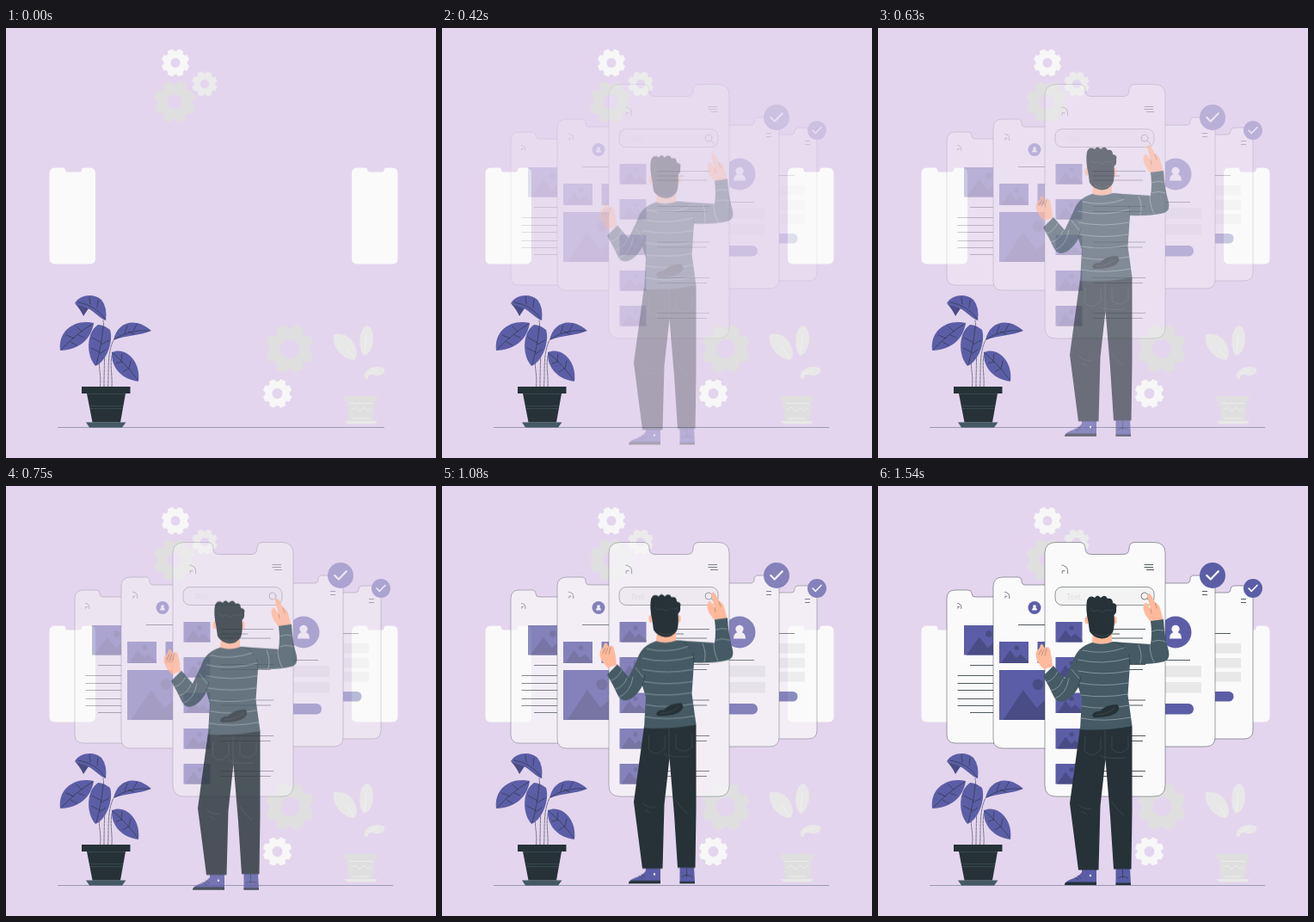
Recreate the animation shown at these times as an HTML page. Size 500x500 px, loop 1620 ms.

```html
<!DOCTYPE html>
<html lang="en">
<head>
<meta charset="utf-8">
<title>App screens</title>
<style>
  html, body { margin: 0; width: 100%; height: 100%; overflow: hidden; background: #e4d5ee; }
  svg { display: block; width: 100vw; height: 100vh; }
  .ink { fill: none; stroke: #263238; stroke-width: .6; stroke-linecap: round; stroke-linejoin: round; }
  .rule { fill: none; stroke: #263238; stroke-width: .8; }
  .screen { fill: #fafafa; stroke: #263238; stroke-width: .45; }
  .violet { fill: #5b5ea6; }
  .deep { fill: #4a4c85; }
  .dark { fill: #263238; }
  .slate { fill: #455a64; }
  .skin { fill: #ffb99b; }
  .pale { fill: #e8e8e8; }
  .grey { fill: #dfdfdf; }
  .white { fill: #fafafa; }
  .tick { fill: none; stroke: #fff; stroke-linecap: round; stroke-linejoin: round; }
  .knit { fill: none; stroke: #aebbc1; stroke-width: .6; stroke-linecap: round; }
  .seam { fill: none; stroke: #4d5b63; stroke-width: .5; }
</style>
</head>
<body>
<svg viewBox="0 0 500 500" xmlns="http://www.w3.org/2000/svg">
  <g id="gears"></g>

  <g class="white">
    <path id="blank" d="M57 162.500H66Q69 162.500 69 165Q69 167.500 72 167.500H85Q88 167.500 88 165Q88 162.500 91 162.500H97.500Q104 162.500 104 169V268Q104 274.500 97.500 274.500H57Q50.500 274.500 50.500 268V169Q50.500 162.500 57 162.500Z"/>
    <use href="#blank" x="351.500"/>
  </g>

  <path id="floor" fill="none" stroke="#75839a" stroke-width=".7"/>

  <!-- pale pot -->
  <g class="pale">
    <path d="M381 357C379 371 391 385 405 386C413 380 404 355 387 356Q383 355 381 357Z"/>
    <path d="M417 381C408 375 410 348 420 346C431 350 428 377 417 381Z"/>
    <path d="M417 407C415 396 430 391 440 396C442 403 433 406 426 403Q420 403 421 408Z"/>
    <path class="grey" d="M394 428H432V434H429.500L427 457H399L396.500 434H394Z"/>
    <path d="M394 457H432L429 460.500H397Z"/>
    <path d="M399 436.500H427M401 444l5 -3 5 5 5 -5 5 4 4 -3M403 454H423" fill="none" stroke="#eee" stroke-width=".9"/>
    <path d="M395 371L404 383M419 356L417 378M421 402L432 398" fill="none" stroke="#f5f5f5" stroke-width=".6"/>
  </g>

  <!-- plant -->
  <path class="ink" stroke-dasharray="3 1.200" d="M109.500 417C111 402 107 395 109 385M114 417C114 390 116 370 113 340M118.500 417C120 398 117 380 125 363M123 417C124 404 120 390 124 378"/>
  <g class="violet">
    <path d="M80 320C86 310 102 308 111 316Q118 325 116 340C108 337 102 329 95 326Z"/>
    <path class="deep" d="M80 320L96 326L90 335Q87 328 80 320Z"/>
    <path d="M102 343C80 338 60 352 63 375C84 374 99 363 102 343Z"/>
    <path d="M107 345C93 354 93 381 104 393C118 387 125 363 121 351Q114 345 107 345Z"/>
    <path d="M125 363C129 342 150 335 169 352C155 358 140 357 125 363Z"/>
    <path d="M123 377C122 397 137 409 154 411C157 387 139 370 123 377Z"/>
  </g>
  <path class="ink" d="M116 339Q104 322 84 319M106 325L107 316M98 321L97 313M101 344Q82 355 65 373M88 353L82 347M79 361L70 357M84 357L91 360M75 365L82 369M113 347Q111 370 105 391M111 366L100 360M109 377L99 372M111 368L120 363M109 379L116 374M126 362Q144 350 166 352M138 355L141 346M148 352L152 345M142 353L149 356M124 378Q138 389 153 409M134 387L135 379M143 396L145 387M135 388L128 390M142 396L136 400"/>
  <path class="slate" d="M93 458.500H139.500L135 464.500H97Z"/>
  <path class="dark" d="M88 417H144.500V425H139L133 458.500H100.500L94 425H88Z"/>
  <path d="M95 425.500H138M98 439.500H136M98 442.500H135" fill="none" stroke="#455a64" stroke-width=".6"/>

  <g id="phones"></g>

  <g id="man">
    <!-- shoes -->
    <path class="violet" d="M237 445H254V463H217Q219 459 225 457Q234 454 237 449Z"/>
    <path class="violet" d="M276.500 444H293L294 463H276.500Z"/>
    <path class="dark" d="M217 464Q217 461 219 460.500H254V464ZM276.500 461.500H294V464H276.500Z"/>
    <path class="ink" d="M232 453l4 3M229 455l4 3M284.500 446v10M279 456q6 -4 12 0"/>
    <circle cx="247" cy="453" r="1.200" class="white"/>
    <!-- trousers -->
    <path class="dark" d="M235 281L223 369L233 446.500H256.500L258.500 372L264.500 318L270 384L274 445.500H294.500L295.500 378V279Z"/>
    <path class="seam" d="M241 291L240 308Q245 313 251 313L259 307V292M272 291V306Q277 311 283 310L291 305V290M264 284V318M258 313Q264 318 288 316M233 370Q239 377 248 375M236 378l7 4M272 367Q277 376 286 383"/>
    <!-- hands -->
    <path class="skin" d="M193 213C186 207 182 199 184 193L188 188Q189 182 192 185L194 189Q198 185 200 190L202 200L203 210Z"/>
    <path class="skin" d="M318 159C312 152 307 145 309 138Q312 133 314 139L317 143L313 128Q314 123 317 126L322 135Q328 138 329 146L332 158Z"/>
    <path d="M187 196l3 -6M190 197l3 -7M194 197l2 -8M317 143l1 5M322 136l2 6" class="ink" stroke-opacity=".5"/>
    <!-- neck and sweater -->
    <path class="skin" d="M250 168H272V181Q262 188 249 183Z"/>
    <path class="slate" d="M249 182Q261 186 273 181L286 182L317 184Q319 172 317 157L332 155Q333 175 338 192Q340 201 333 204Q316 208 293 207L290.500 243L295.500 279Q265 285 235 283L237 247L233 234Q224 250 213 251Q207 251 204 244Q199 233 192 221L204 209L217 224L227 203Q232 187 249 182Z"/>
    <path class="knit" d="M238 191Q262 197 287 188M233 202Q260 209 293 200M233 215Q262 221 292 215M234 229Q262 234 291 229M236 243Q262 247 290 242M237 256Q262 261 292 255M236 270Q262 275 294 269M303 185Q308 196 305 206M316 184Q316 196 321 205M319 181Q326 178 334 181M318 169Q325 166 332 168M196 228Q204 226 209 216M201 238Q211 236 215 225M206 247Q219 242 222 224M225 213L234 224"/>
    <path class="dark" d="M249 267Q250 262 258 262Q265 254 278 254Q283 258 277 264Q269 269 255 269Q250 270 249 267Z"/>
    <path class="seam" d="M254 266Q266 266 276 258"/>
    <path class="ink" d="M277 182Q284 183 288 190M233 233L236 222M293 207L292 196"/>
    <!-- head -->
    <ellipse class="skin" cx="243" cy="156" rx="2.600" ry="4.500"/>
    <ellipse class="skin" cx="275" cy="156" rx="2.600" ry="4.500"/>
    <path class="dark" d="M244.500 158Q241 143 243 133Q246 126 252 130Q255 125 259 130Q264 125 267 131Q273 130 273 136Q279 137 277 142Q278 147 274.500 150Q275.500 164 273 170Q268 177.500 260 177.500Q250 176 246 169Z"/>
    <path class="seam" d="M247 142q4 6 8 2M256 144q4 5 9 0M266 143q4 4 8 0M252 172q8 5 17 0"/>
  </g>
</svg>
<script>
const $ = id => document.getElementById(id);

const gear = (x, y, r, hole, fill) => {
  const teeth = 8, pts = [];
  for (let i = 0; i < teeth; i++) {
    for (const [turn, k] of [[-.33, .83], [-.23, 1], [.23, 1], [.33, .83]]) {
      const a = (i + .5 + turn) / teeth * 2 * Math.PI;
      pts.push((x + r * k * Math.sin(a)).toFixed(1) + ' ' + (y - r * k * Math.cos(a)).toFixed(1));
    }
  }
  const ring = `M${x - hole} ${y}a${hole} ${hole} 0 1 0 ${2 * hole} 0a${hole} ${hole} 0 1 0 ${-2 * hole} 0Z`;
  return `<path fill="${fill}" stroke="${fill}" stroke-linejoin="round" fill-rule="evenodd" d="M${pts.join('L')}Z${ring}"/>`;
};

$('gears').innerHTML =
  gear(196, 86, 24, 9, '#dfdfdf') + gear(197, 40.5, 16, 6, '#f7f7f7') +
  gear(231, 65, 14.5, 5.5, '#ebebeb') + gear(330, 373, 28, 11.5, '#dfdfdf') +
  gear(315.5, 425, 16.5, 6.5, '#f7f7f7');

// Phone outline with a notch between n1 and n2.
const phone = (x1, y1, x2, y2, r, n1, n2, depth) => {
  const q = depth / 2;
  return `<path class="screen" d="M${x1 + r} ${y1}H${n1 - q}q${q} 0 ${q} ${q}q0 ${q} ${q} ${q}H${n2 - q}` +
    `q${q} 0 ${q} ${-q}q0 ${-q} ${q} ${-q}H${x2 - r}q${r} 0 ${r} ${r}V${y2 - r}q0 ${r} ${-r} ${r}` +
    `H${x1 + r}q${-r} 0 ${-r} ${-r}V${y1 + r}q0 ${-r} ${r} ${-r}Z"/>`;
};
const box = (x, y, w, h, cls, r = 0) =>
  `<rect class="${cls}" x="${x}" y="${y}" width="${w}" height="${h}" rx="${r}"/>`;
const dot = (x, y, r, cls) => `<circle class="${cls}" cx="${x}" cy="${y}" r="${r}"/>`;
const rule = (x1, x2, ...ys) =>
  `<path class="rule" d="${ys.map(y => `M${x1} ${y}H${x2}`).join('')}"/>`;

// Picture placeholder: sun and two hills.
const picture = (x, y, w, h) => box(x, y, w, h, 'violet') +
  dot(x + w * .6, y + h * .29, h * .11, 'deep') +
  `<path class="deep" d="M${x + w * .06} ${y + h}L${x + w * .37} ${y + h * .4}L${x + w * .58} ${y + h * .76}` +
  `L${x + w * .73} ${y + h * .58}L${x + w} ${y + h * .92}V${y + h}Z"/>`;

const person = (x, y, r) => dot(x, y, r, 'violet') + dot(x, y - r * .2, r * .25, 'white') +
  `<path class="white" d="M${x - r * .38} ${y + r * .4}q0 ${-r * .42} ${r * .38} ${-r * .42}q${r * .38} 0 ${r * .38} ${r * .42}Z"/>`;

const check = (x, y, r) => dot(x, y, r, 'violet') +
  `<path class="tick" stroke-width="${r * .15}" d="M${x - r * .45} ${y}l${r * .3} ${r * .3}l${r * .6} ${-r * .62}"/>`;

const home = (x, y, s) =>
  `<path class="ink" d="M${x - s * .8} ${y - s * 1.2}h${s * .4}q${s * 1.3} ${s * .5} ${s * 1.3} ${s * 1.4}v${s}M${x - s * .7} ${y + s * 1.1}v${-s * .7}h${s * .7}"/>`;

$('phones').innerHTML = [
  phone(80, 121, 190, 299, 10, 109, 160, 8),
  home(94.5, 139.5, 2.5), picture(100, 162, 48, 34.5),
  rule(107, 140, 208.5, 263.5), rule(92.5, 140, 220.5, 229.5, 237.5, 247.5, 255.5),

  phone(330, 116, 436, 294, 10, 350, 410, 8),
  rule(385, 410, 171.5), rule(422, 428, 131.5, 135.5),
  [183, 200, 216].map(y => box(380, y, 42, 11.5, 'pale')).join(''),
  box(380, 239, 33.5, 11.5, 'violet', 5.5),

  phone(134, 106, 260, 305, 11, 167, 225, 9),
  home(150, 127, 3), person(182, 141.5, 7.5), rule(163, 200, 161.5),
  picture(141, 181, 34, 25), picture(185.5, 181, 34, 25), picture(141, 214, 75, 58),

  phone(270, 104, 392, 303, 11, 300, 363, 9),
  rule(377, 383, 122.5, 126.5), person(346, 170, 18.5), rule(325, 363, 202.5),
  box(320, 209, 56, 13, 'pale'), box(320, 228, 56, 12.5, 'pale'),
  box(315, 253, 52, 12.5, 'violet', 6),

  phone(194, 65.5, 334, 361, 13, 241, 292, 14),
  home(217, 97, 4), rule(309.5, 320, 91.5, 94.5), rule(312, 321, 97.5),
  '<rect x="206" y="117.500" width="115" height="21" rx="8" fill="#f3f3f3" stroke="#263238" stroke-width=".5"/>',
  '<text x="219" y="131.500" font-family="Lato, Inter, sans-serif" font-size="9" fill="#dfdfdf">Text</text>',
  '<path class="ink" d="M314 128a4 4 0 1 0 -8 0a4 4 0 1 0 8 0M313 131l4 4"/>',
  [158, 199, 240.5, 282, 323].map((y, i) => picture(206.5, y, 31, 23.5) +
    rule(250, 311, y + 8.5) + (i ? '' : rule(250, 281, y + 14)) + rule(250, 308, y + (i ? 14.5 : 19))).join(''),

  check(389, 104, 15), check(436, 119, 11)
].join('');

const LOOP = 1620, RATE = 24 / 1000, LAST = 37;
const hold = (el, frames, opts) => {
  const a = el.animate(frames, { fill: 'both', ...opts });
  a.pause();
  return a;
};
const rise = hold($('man'), [
  { opacity: 0, transform: 'translateY(30px)' },
  { opacity: 1, transform: 'translateY(0)' }
], { duration: 1400, easing: 'cubic-bezier(.36,-.01,.5,1.38)' });

const fades = [[0, 0], [210, .05], [420, .17], [630, .31], [750, .41], [960, .6], [1290, .87], [1540, 1]];
const fade = hold($('phones'),
  fades.map(([t, opacity]) => ({ offset: t / 1540, opacity })), { duration: 1540 });

function draw(now) {
  // Stepped at 24 pictures a second; the scene stays empty for the first five.
  const step = Math.min(LAST, Math.floor((Math.max(0, now) % LOOP + 5) * RATE));
  const t = step < 5 ? 0 : step / RATE;
  rise.currentTime = t;
  fade.currentTime = t;
  $('floor').setAttribute('d', `M60 464.500H${step ? 450 : 440}`);
  requestAnimationFrame(draw);
}
draw(performance.now());
</script>
</body>
</html>
```
